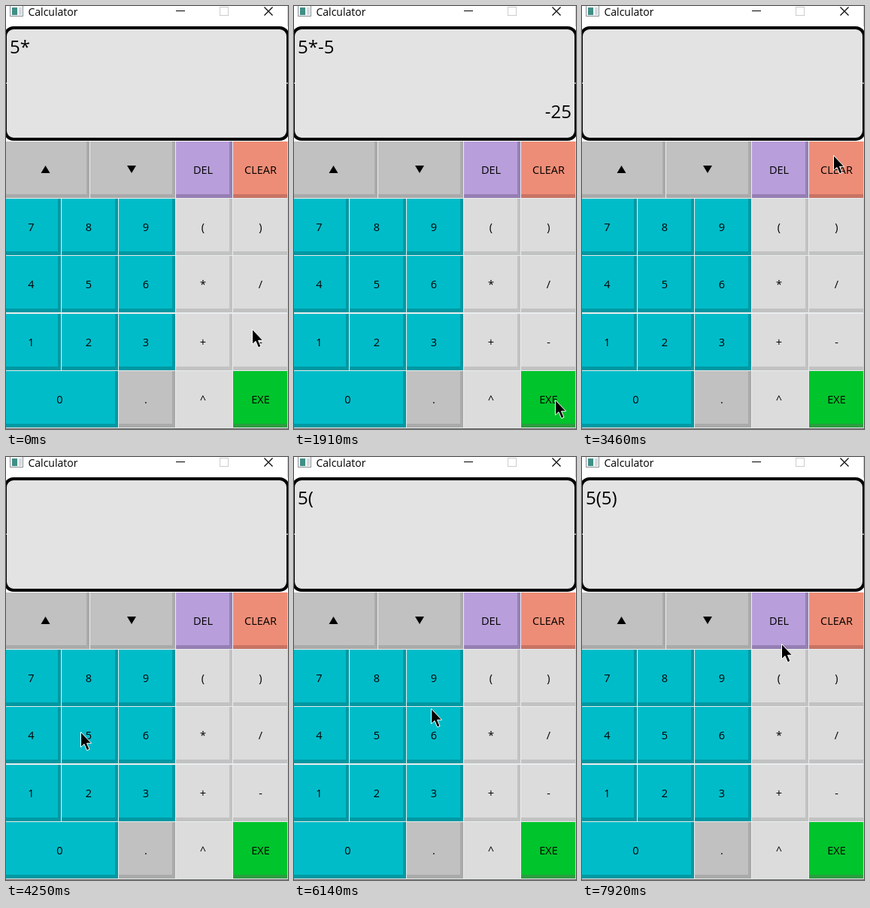
An HTML page for the animation above (8000 ms loop, 375x562 px).

```html
<!DOCTYPE html>
<html lang="en">
<head>
<meta charset="utf-8">
<title>Calculator</title>
<style>
html, body { margin: 0; width: 100%; height: 100%; overflow: hidden; background: #fff; }
svg { display: block; width: 375px; height: 562px; }
text { font-family: "Open Sans", "Noto Sans", sans-serif; font-size: 14.5px; fill: #000; }
.name { font-size: 14px; }
.key { text-anchor: middle; }
.out { font-size: 24px; }
</style>
</head>
<body>
<svg viewBox="0 0 375 562">
  <rect width="375" height="562" fill="#fff"/>
  <g id="title">
    <rect x="5.5" y="-2.5" width="17" height="16" fill="#f4f6f6" stroke="#8a9297"/>
    <rect x="8" y="2" width="7" height="10" fill="#3f8f86"/>
    <rect x="17" y="2" width="4" height="10" fill="#d3dadd"/>
    <text class="name" x="29.5" y="13">Calculator</text>
    <path d="M226 6.5h12" stroke="#000"/>
    <rect x="284.5" y="1.5" width="11" height="11" fill="none" stroke="#ccc"/>
    <path d="M343.5 1.5l11 11m0 -11l-11 11" stroke="#000" stroke-width="1.2"/>
    <path d="M374.5 0v27" stroke="#ccc"/>
  </g>
  <rect x="-1" y="29" width="376" height="148" rx="11" fill="#e3e3e3" stroke="#000" stroke-width="4"/>
  <path d="M0 102.5h2m371 0h2" stroke="#fff"/>
  <text id="entry" class="out" x="5" y="63"></text>
  <text id="result" class="out" x="369" y="149" text-anchor="end"></text>
  <rect y="180" width="375" height="381" fill="#e9eded"/>
  <g id="keys"></g>
  <path d="M374.5 180v381" stroke="#d0d0d0"/>
  <path d="M0 561.5h375" stroke="#6a6a6a"/>
  <path id="cursor" d="M.5 .5V20.5L5 16.4L8.6 24.8L12 23.3L8.5 15.3H14.6Z" stroke="#fff"/>
</svg>
<script>
const $ = id => document.getElementById(id);
const LOOP = 8000, BEAT = 132, LEAD = 15;
const PITCH = 76.25;

// face colour, bevel colour
const TONES = {
  cyan: ["#00bcc9", "#0098a2"],
  gray: ["#c1c1c1", "#aaaaaa"],
  light: ["#dcdcdc", "#c2c2c2"],
  flat: ["#dcdcdc", "#dcdcdc"],
  purple: ["#b89fdb", "#957fb3"],
  salmon: ["#ee8d77", "#c87464"],
  green: ["#00c42c", "#2b9e40"]
};

function add(tag, attrs, label = "") {
  const el = document.createElementNS("http://www.w3.org/2000/svg", tag);
  for (const name in attrs) el.setAttribute(name, attrs[name]);
  el.textContent = label;
  $("keys").append(el);
}

const left = col => Math.round(PITCH * col - 2.75);
const top_ = row => Math.round(PITCH * row + 179.75);

function key(label, row, col, tone, span = 1) {
  const x = left(col), y = top_(row), width = left(col + span) - 1 - x;
  const [face, bevel] = TONES[tone];
  const mid = x + width / 2 - 1.5;
  add("rect", { x, y, width, height: 75, fill: bevel });
  add("rect", { x, y, width: width - 4, height: 70, fill: face });
  if (label === "up" || label === "down") {
    const s = label === "up" ? 1 : -1;
    add("path", { d: `M${mid} ${217 - 5 * s}l6 ${10 * s}h-12z` });
  } else {
    add("text", { class: "key", x: mid, y: y + 43 }, label);
  }
}

key("up", 0, 0, "gray", 1.5);
key("down", 0, 1.5, "gray", 1.5);
key("DEL", 0, 3, "purple");
key("CLEAR", 0, 4, "salmon");
["789()", "456*/", "123+-"].forEach((line, row) =>
  [...line].forEach((c, col) => key(c, row + 1, col, col < 3 ? "cyan" : "light")));
key("0", 4, 0, "cyan", 2);
key(".", 4, 2, "gray");
key("^", 4, 3, "flat");
key("EXE", 4, 4, "green");

// Pointer glides: first beat, last beat, where it comes to rest
const GLIDES = [
  [0, 2, 344, 442], [2, 3, 314, 441], [3, 5, 95, 376], [5, 7, 119, 373],
  [8, 9, 134, 400], [9, 12, 347, 523], [18, 20, 321, 527], [20, 25, 334, 198],
  [28, 32, 99, 365], [33, 35, 252, 311], [35, 38, 121, 355], [39, 42, 261, 291],
  [42, 44, 262, 285], [45, 48, 118, 373], [50, 52, 324, 345], [52, 56, 327, 303],
  [58, 60, 265, 248]
];
const PRESSES = [
  [3, "-"], [8, "5"], [14, "EXE"], [26, "CLEAR"],
  [38, "5"], [43, "("], [48, "5"], [56, ")"]
];

const easeOut = u => u * (2 - u);

function pointer(beat) {
  let x = 327, y = 429;
  for (const [from, to, endX, endY] of GLIDES) {
    if (beat <= from) break;
    const k = easeOut(Math.min(1, (beat - from) / (to - from)));
    x += (endX - x) * k;
    y += (endY - y) * k;
  }
  return `translate(${Math.round(x)} ${Math.round(y)})`;
}

function screen(beat) {
  let entry = "5*", result = "";
  for (const [when, name] of PRESSES) {
    if (beat < when) break;
    if (name === "EXE") result = entry.split("*").reduce((a, b) => a * b);
    else if (name === "CLEAR") entry = result = "";
    else entry += name;
  }
  return [entry, result];
}

function draw(t) {
  const beat = Math.floor((t + LEAD) / BEAT);
  const [entry, result] = screen(beat);
  $("cursor").setAttribute("transform", pointer(beat));
  $("entry").textContent = entry;
  $("result").textContent = result;
}

const start = performance.now();
function tick() {
  draw((performance.now() - start) % LOOP);
  requestAnimationFrame(tick);
}
tick();
</script>
</body>
</html>
```
